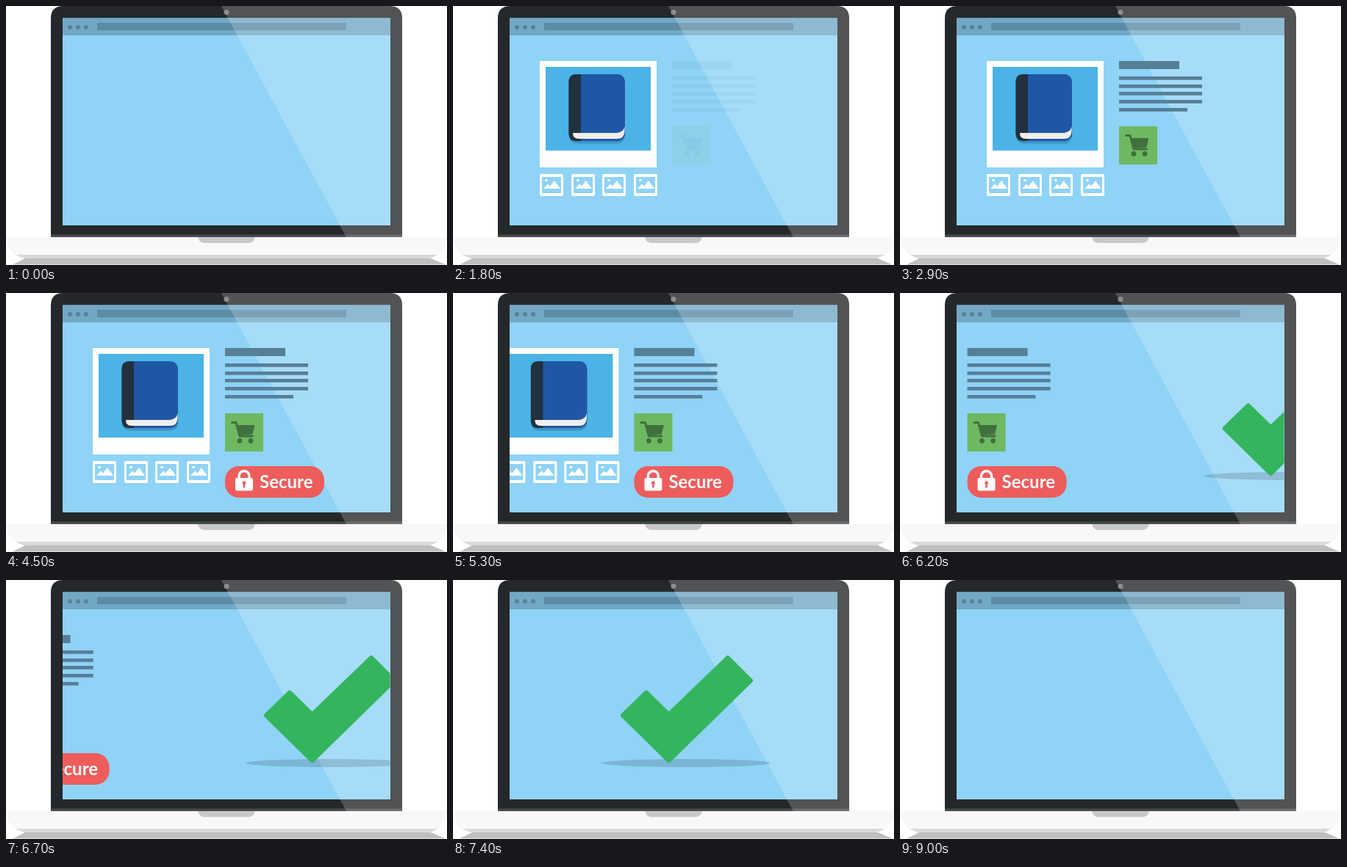
Write an HTML page that moves like this. It is 600x353 px and loops after 9100 ms.

```html
<!DOCTYPE html>
<html lang="en">
<head>
<meta charset="utf-8">
<title>Secure checkout</title>
<style>
  html, body { margin: 0; width: 100%; height: 100%; overflow: hidden; background: #fff; }
  svg { display: block; }
  text { font: 700 24px Lato, "Open Sans", sans-serif; }
</style>
</head>
<body>
<svg width="600" height="353" viewBox="0 0 600 353">
  <defs>
    <clipPath id="screen"><rect x="77" y="40" width="445.5" height="259"/></clipPath>
    <clipPath id="lid"><path d="M61 315V17Q61 0 78 0H522Q539 0 539 17V315Z"/></clipPath>
    <g id="thumb">
      <rect width="32" height="30" rx="2" fill="#fff"/>
      <rect x="3" y="4" width="26" height="22" rx="1" fill="#8fd3f6"/>
      <path d="M5 20 11 13.5 14 16.5 20 9 28 20Z" fill="#fff"/>
      <circle cx="9" cy="8.5" r="1.8" fill="#fff"/>
    </g>
  </defs>

  <!-- laptop -->
  <g clip-path="url(#lid)">
    <rect x="61" width="478" height="315" fill="#25282b"/>
    <rect x="61" y="311.5" width="478" height="4" fill="#46494c"/>
    <rect x="77" y="16.5" width="446" height="282.5" fill="#8fd3f6"/>
    <rect x="77" y="16.5" width="446" height="23.5" fill="#72a8c5"/>
    <g fill="#588299">
      <circle cx="87" cy="29" r="3"/><circle cx="98" cy="29" r="3"/><circle cx="109" cy="29" r="3"/>
    </g>
    <rect x="124" y="23" width="339" height="10" fill="#5b8ba5"/>
    <path d="M293 0H539V315H463Z" fill="#fff" opacity=".2"/>
    <circle cx="300" cy="8.5" r="3.5" fill="#8e8e8e"/>
  </g>
  <path d="M27 343.5H577L598 352.5H9Z" fill="#bfbfbf"/>
  <path d="M12 338.5H588Q583 342 576 344H25Q18 342 12 338.5Z" fill="#d9d9d8"/>
  <path d="M0 315H600Q598 332 588 339H12Q2 332 0 315Z" fill="#f9f7f8"/>
  <path d="M261 315H339Q337 323 330 323H270Q263 323 261 315Z" fill="#c9c9c9"/>

  <g clip-path="url(#screen)">
    <g id="page">
      <g id="product">
        <rect x="118" y="75" width="159" height="145" fill="#fff"/>
        <rect x="126" y="83" width="143" height="114" fill="#4bb3e6"/>
        <rect x="158" y="97" width="76" height="90.5" rx="10" fill="#3b94c4"/>
        <rect x="157.5" y="93" width="76.5" height="91" rx="10" fill="#1f57a5"/>
        <path d="M174 93H167.5Q157.5 93 157.5 103V174Q157.5 184 167.5 184H174Z" fill="#22313f"/>
        <path d="M163 173H223Q232 172 233.5 164V171Q233 181 223 181H171Q163 181 163 173Z" fill="#f0eeea"/>
        <use href="#thumb" x="118" y="229"/>
        <use href="#thumb" x="161" y="229"/>
        <use href="#thumb" x="203" y="229"/>
        <use href="#thumb" x="246" y="229"/>
      </g>
      <g id="details">
        <path d="M298 75h82v11h-82zM298 96h113v4.7h-113zM298 107h113v4.7h-113zM298 117h113v4.7h-113zM298 128h113v4.7h-113zM298 139h93v4.7h-93z" fill="#567f97"/>
        <rect x="298" y="164" width="52" height="52" fill="#6fb862"/>
        <g fill="#41703f">
          <path d="M313 180H338.5L335.5 192.5 317.5 194Z"/>
          <circle cx="318" cy="201.5" r="3.4"/><circle cx="333" cy="201.5" r="3.4"/>
          <path d="M307.5 176.5H313L318 195H335.5" fill="none" stroke="#41703f" stroke-width="3" stroke-linecap="round" stroke-linejoin="round"/>
        </g>
      </g>
      <g id="badge">
        <rect x="298" y="236" width="135" height="43" rx="19" fill="#ee5c5c"/>
        <rect x="312" y="252" width="24" height="17.5" rx="2.5" fill="#fff"/>
        <path d="M317 253V249.500a7 7 0 0 1 14 0V253" fill="none" stroke="#fff" stroke-width="3.4"/>
        <path d="M322.700 260H325.300V265.500H322.700Z" fill="#ee5c5c"/>
        <circle cx="324" cy="259" r="2.4" fill="#ee5c5c"/>
        <text x="345" y="265.500" fill="#fff">Secure</text>
      </g>
    </g>
    <g id="done">
      <ellipse cx="300" cy="249.500" rx="115" ry="5.500" opacity=".14"/>
      <path d="M213.400 184.500 245.400 153.500 276 183.500 356.400 106 387.400 137 276 246Z" fill="#33b55e" stroke="#33b55e" stroke-width="6" stroke-linejoin="round"/>
    </g>
  </g>
</svg>
<script>
  const LOOP = 9100, TICK = 100;
  const el = id => document.getElementById(id);
  const [page, product, details, badge, done] =
    ["page", "product", "details", "badge", "done"].map(el);

  // Completed ticks of a linear phase whose first change falls on `start`.
  const ticks = (now, start, count) =>
    Math.max(0, Math.min(count, Math.floor((now - start) / TICK) + 1));
  const fade = (node, value) => node.setAttribute("opacity", value);
  const shift = (node, x) => node.setAttribute("transform", `translate(${x})`);

  function draw(time) {
    const now = time % LOOP;
    fade(product, ticks(now, 200, 12) / 12);
    fade(details, ticks(now, 1800, 12) / 12);
    fade(badge, ticks(now, 3300, 13) / 13);
    const slide = ticks(now, 5100, 25);
    shift(page, -17.2 * slide);
    shift(done, 17.57 * (25 - slide));
    fade(done, 1 - ticks(now, 7800, 13) / 13);
  }

  const origin = performance.now();
  function frame() {
    draw(performance.now() - origin);
    requestAnimationFrame(frame);
  }
  frame();
</script>
</body>
</html>
```
